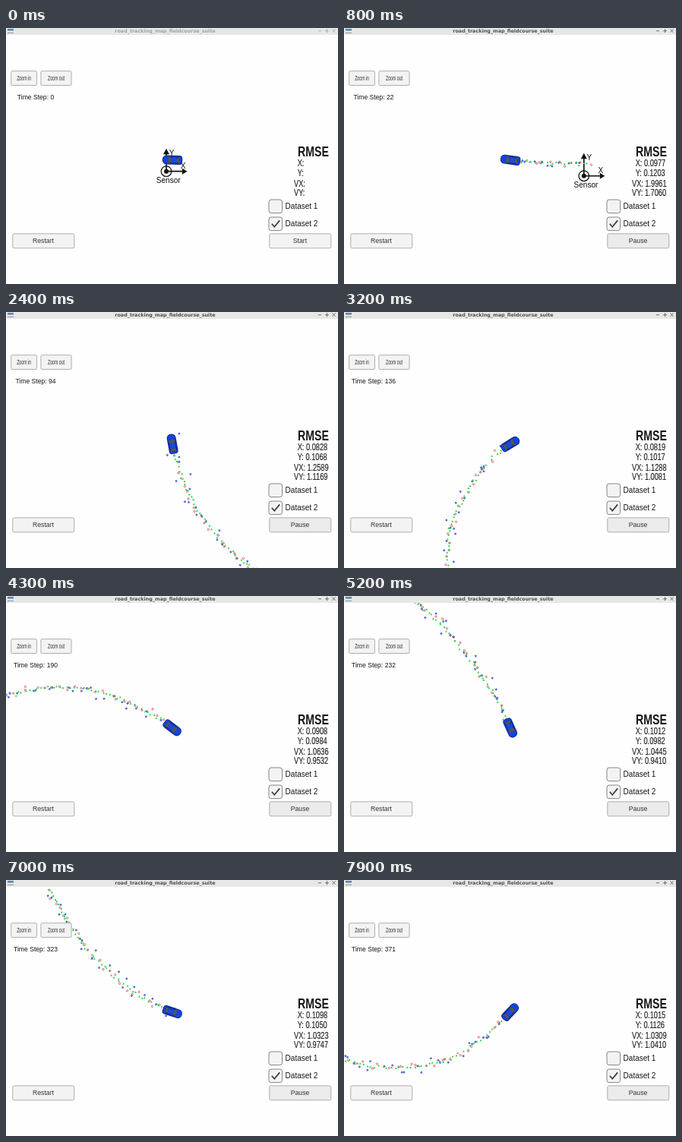
Recreate the animation shown at these times as an HTML page with a canvas. Size 437 by 337 pixels, loop 8000 ms.

```html
<!DOCTYPE html>
<html lang="en">
<head>
<meta charset="utf-8">
<title>Tracking run</title>
<style>
  html, body { margin: 0; width: 100%; height: 100%; overflow: hidden; background: #fefefe; }
  canvas, svg { position: absolute; left: 0; top: 0; width: 437px; height: 337px; }
  text { font-family: "Liberation Sans", Arial, sans-serif; fill: #161616; white-space: pre; }
  .mid { text-anchor: middle; }
  .title { font: bold 6.4px "DejaVu Sans", sans-serif; fill: #505050; }
  .bar path { stroke: #606060; stroke-width: .9; }
  .idle .title { fill: #a2a2a2; }
  .idle path { stroke: #aaa; }
  .btn rect { fill: #f3f3f3; stroke: #a6a6a6; stroke-width: .9; }
  .btn text { font-size: 8.7px; fill: #333; }
  .btn .narrow { font-size: 8.3px; }
  .running rect { fill: #ebebeb; }
  .box { fill: #f3f3f3; stroke: #858585; }
  .label { font-size: 10px; }
  .stat { font-size: 12px; fill: #262626; stroke: #262626; stroke-width: .2; }
</style>
</head>
<body>
<canvas id="scene"></canvas>
<svg viewBox="0 0 437 337">
  <g class="bar" id="bar">
    <rect width="437" height="9" fill="#e7e7e6"/>
    <rect x="2" y="1" width="8" height="6" fill="#dfe8ee"/>
    <rect x="2" y="1" width="8" height="2.6" fill="#5d87a6"/>
    <rect x="2" y="6.2" width="8" height=".8" fill="#6f7f88"/>
    <text class="title mid" x="209.5" y="5.8">road_tracking_map_fieldcourse_suite</text>
    <path d="M411 3.8h4M420 3.8h5M422.5 1.3v5M429.5 1.5l4 4.3M433.5 1.5l-4 4.3"/>
  </g>
  <g class="btn">
    <rect x="6.7" y="56.7" width="33.8" height="18.8" rx="1.5"/>
    <text class="narrow mid" transform="translate(23.6 69.2) scale(.63 1)">Zoom in</text>
    <rect x="45.9" y="56.7" width="40.2" height="18.8" rx="1.5"/>
    <text class="narrow mid" transform="translate(66 69.2) scale(.63 1)">Zoom out</text>
    <rect x="8.8" y="270.8" width="81" height="19" rx="2"/>
    <text class="mid" x="49" y="283.4">Restart</text>
  </g>
  <g class="btn" id="run">
    <rect x="346.8" y="270.8" width="81" height="19" rx="2"/>
    <text class="mid" x="387" y="283.4" id="runText">Start</text>
  </g>
  <rect class="box" x="346" y="226" width="17.6" height="17.6" rx="3"/>
  <rect class="box" x="346" y="249" width="17.6" height="17.6" rx="3"/>
  <path d="M349.8 257.8L353.3 261.8L360.2 253.4" fill="none" stroke="#3a3a3a" stroke-width="1.7"/>
  <text class="label" x="367.6" y="238.3">Dataset 1</text>
  <text class="label" x="367.6" y="261.3">Dataset 2</text>
  <text class="mid" x="39" y="94.4" font-size="8.6" id="step">Time Step: 0</text>
  <text transform="translate(384 168.6) scale(.77 1)" font-size="18.4" font-weight="bold">RMSE</text>
  <text class="stat" transform="translate(383.7 182) scale(.77 1)">X:</text>
  <text class="stat" transform="translate(383.7 195.3) scale(.77 1)">Y:</text>
  <text class="stat" transform="translate(379 208.8) scale(.77 1)">VX:</text>
  <text class="stat" transform="translate(379 221) scale(.77 1)">VY:</text>
</svg>
<script>
const W = 437, H = 337, LOOP = 8000, TICK = 100, STEPS = 371;
const CAR = { x: 219, y: 173.7 };

// Time in ms and the step reached
const pace = [[200, 0], [1600, 51], [3200, 136], [4300, 190],
  [6100, 274], [7000, 323], [7900, STEPS]];

// Car positions from the sensor, one every SPAN steps; the ends only set the direction
const SPAN = 27;
const route = [[140, -16], [8, -15], [-121, -25], [-256, -67], [-342, -169],
  [-362, -299], [-286, -412], [-159, -438], [-39, -388], [47, -292], [104, -177],
  [152, -54], [220, 54], [328, 129], [460, 128], [568, 38], [630, -80]];

// Error of each estimate: settling decay or slow drift
const errors = [
  ["X:", n => .096 - .0147 * Math.cos((n - 120) / 58)],
  ["Y:", n => .098 + .0146 * ((n - 215) / 156) ** 2],
  ["VX:", n => 1.03 + 1.5 * Math.exp(-n / 50)],
  ["VY:", n => .92 + 1.2 * Math.exp(-n / 52) + .12 * (n / STEPS) ** 6]
];

function stepAt(t) {
  if (t <= pace[0][0]) return 0;
  const i = pace.findIndex(k => t <= k[0]);
  const [t0, n0] = pace[i - 1], [t1, n1] = pace[i];
  return Math.round(n0 + (n1 - n0) * (t - t0) / (t1 - t0));
}

// Catmull-Rom curve through the route
function place(n) {
  const i = Math.floor(n / SPAN), u = n / SPAN - i;
  const axis = k => {
    const [a, b, c, d] = route.slice(i, i + 4).map(p => p[k]);
    return b + u / 2 * (c - a + u * (2 * a - 5 * b + 4 * c - d + u * (3 * (b - c) + d - a)));
  };
  return { x: axis(0), y: axis(1) };
}

function heading(n) {
  const a = place(n), b = place(n + .5);
  return Math.atan2(b.y - a.y, b.x - a.x);
}

let seed = 41;
function random() {
  seed = (seed * 16807) % 2147483647;
  return seed / 2147483647;
}
const noise = s => s * (random() + random() + random() + random() - 2) * 1.73;

// Red lidar and blue radar readings take turns; a green estimate follows each
const marks = Array.from({ length: STEPS }, (_, i) => {
  const p = place(i + 1), radar = i % 2 === 1;
  const range = Math.hypot(p.x, p.y), a = Math.atan2(p.y, p.x);
  const out = noise(radar ? 4.5 : 2.4), side = noise(radar ? 1.5 + .014 * range : 2.4);
  return {
    radar,
    x: p.x + out * Math.cos(a) - side * Math.sin(a),
    y: p.y + out * Math.sin(a) + side * Math.cos(a),
    ex: p.x + noise(1.2), ey: p.y + noise(1.2)
  };
});

const canvas = document.getElementById("scene"), g = canvas.getContext("2d");
const ratio = window.devicePixelRatio || 1;
canvas.width = W * ratio;
canvas.height = H * ratio;

function disc(x, y, r, fill, stroke) {
  g.beginPath();
  g.arc(x, y, r, 0, 7);
  if (fill) { g.fillStyle = fill; g.fill(); }
  if (stroke) { g.strokeStyle = stroke; g.stroke(); }
}

function poly(fill, ...pts) {
  g.beginPath();
  pts.forEach(([x, y]) => g.lineTo(x, y));
  g.closePath();
  g.fillStyle = fill;
  g.fill();
}

function pill(x, y, w, h, r, fill) {
  g.beginPath();
  g.roundRect(x, y, w, h, r);
  g.fillStyle = fill;
  g.fill();
}

function drawSensor() {
  g.lineWidth = 1.2;
  disc(0, 0, 6.8, "#fefefe", "#111");
  disc(0, 0, 3, "#111");
  g.lineWidth = 1.7;
  g.beginPath();
  g.moveTo(0, -24); g.lineTo(0, 0); g.lineTo(22, 0);
  g.stroke();
  poly("#111", [0, -30], [-4, -22.5], [4, -22.5]);
  poly("#111", [27.5, 0], [21, -4], [21, 4]);
  g.font = '10.1px "Liberation Sans", Arial, sans-serif';
  g.textAlign = "center";
  g.fillText("Y", 7.2, -20.3);
  g.fillText("X", 22, -3.6);
  g.fillText("Sensor", 2.7, 14.8);
}

function drawMark(m) {
  g.lineWidth = .75;
  if (m.radar) disc(m.x, m.y, 1, "#8fa4e8", "#1a35c8");
  else disc(m.x, m.y, 1.15, null, "#f0304a");
  poly("#16d236", [m.ex, m.ey - 1.5], [m.ex + 1.4, m.ey + 1], [m.ex - 1.4, m.ey + 1]);
}

function drawCar(angle) {
  const glass = "#5a534c";
  g.save();
  g.translate(CAR.x, CAR.y);
  g.rotate(angle);
  pill(-13.2, -6, 26.4, 12, [4, 5.5, 5.5, 4], "#0b2496");
  pill(-12.4, -5.1, 25, 10.2, [3.5, 5, 5, 3.5], "#1244dc");
  pill(-9.8, -4.8, 15.5, 9.6, 2.5, "#0e2c9c");
  pill(-6, -3.5, 7.8, 7, 1.5, "#1a4bd8");
  poly(glass, [1.6, -3.3], [5, -4.4], [6, 0], [5, 4.4], [1.6, 3.3]);
  poly(glass, [-6, -3], [-9.4, -4], [-9.4, 4], [-6, 3]);
  g.restore();
}

const byId = id => document.getElementById(id);
const bar = byId("bar"), run = byId("run"), runText = byId("runText"), stepText = byId("step");
const stats = document.querySelectorAll(".stat");

function render(t) {
  const n = stepAt(t), on = n > 0, p = place(n);

  g.setTransform(ratio, 0, 0, ratio, 0, 0);
  g.fillStyle = "#fefefe";
  g.fillRect(0, 0, W, H);
  g.save();
  g.translate(CAR.x - p.x, CAR.y - p.y);
  drawSensor();
  marks.slice(0, n).forEach(drawMark);
  g.restore();
  drawCar(heading(n));

  bar.classList.toggle("idle", t < TICK);
  run.classList.toggle("running", on);
  runText.textContent = on ? "Pause" : "Start";
  stepText.textContent = "Time Step: " + n;
  errors.forEach(([name, value], i) => {
    stats[i].textContent = on ? name + " " + value(n).toFixed(4) : name;
  });
}

let last = -1;
function loop() {
  const t = Math.floor(performance.now() % LOOP / TICK) * TICK;
  if (t !== last) render(last = t);
  requestAnimationFrame(loop);
}
loop();
</script>
</body>
</html>
```
